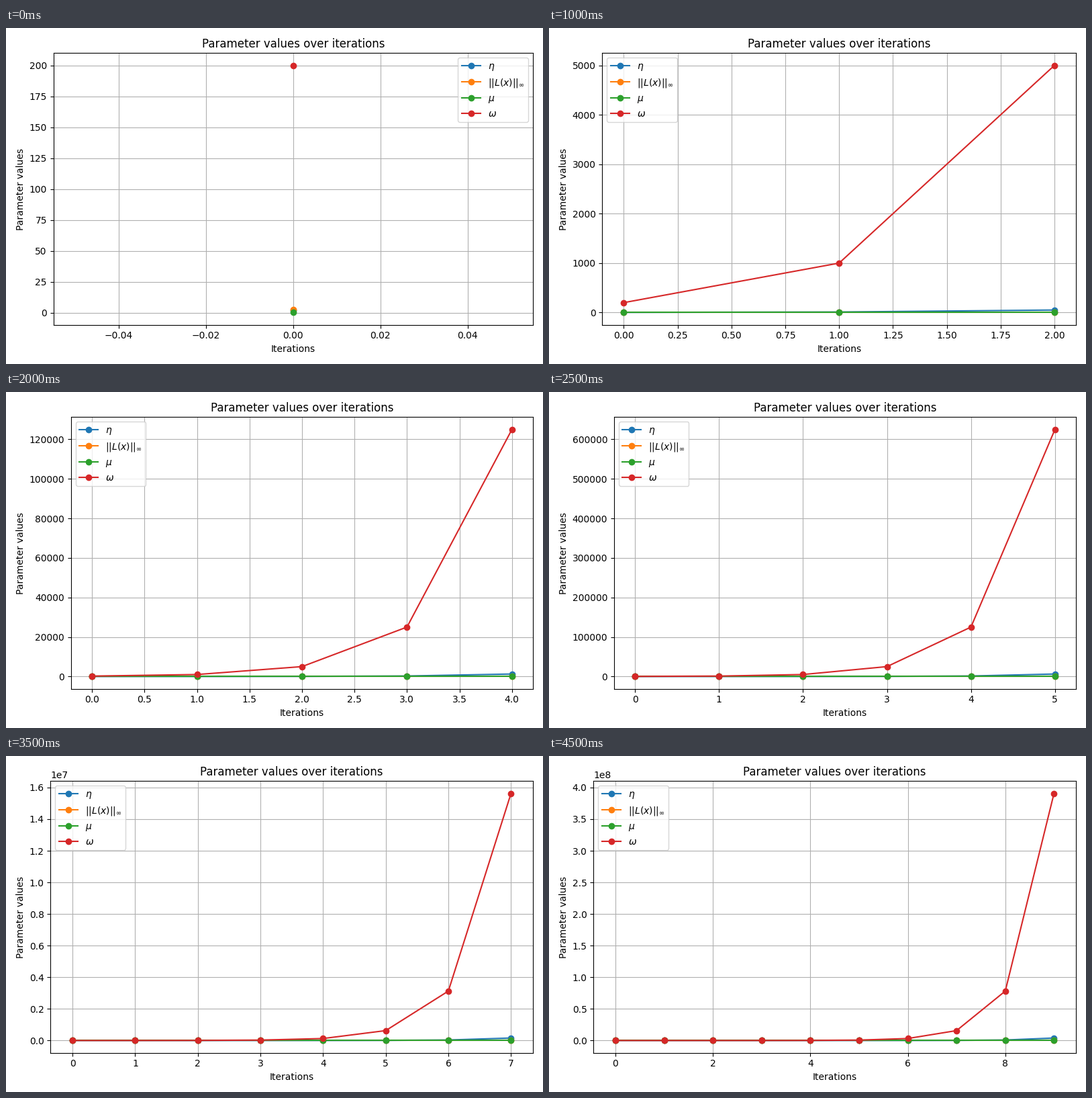
These frames come from a looping animation (800x500 px, 5 s). A matplotlib script:

```python
import numpy as np
import matplotlib.pyplot as plt
from matplotlib.animation import FuncAnimation

STEPS = 10
k = np.arange(STEPS)
omega = 200.0 * 5.0 ** k
series = [
    (r"$\eta$", omega / 100),
    (r"$||L(x)||_\infty$", np.full(STEPS, 2.5)),
    (r"$\mu$", np.full(STEPS, 0.3)),
    (r"$\omega$", omega),
]

fig, ax = plt.subplots(figsize=(8, 5), dpi=100)


def draw(step):
    ax.clear()
    n = step + 1
    for label, values in series:
        ax.plot(k[:n], values[:n], marker="o", label=label)
    ax.set_title("Parameter values over iterations")
    ax.set_xlabel("Iterations")
    ax.set_ylabel("Parameter values")
    ax.legend()
    ax.grid(True)
    fig.tight_layout()
    return ax.lines


anim = FuncAnimation(fig, draw, frames=STEPS, init_func=lambda: draw(0),
                     interval=500, repeat=True, repeat_delay=0)
plt.show()
```
